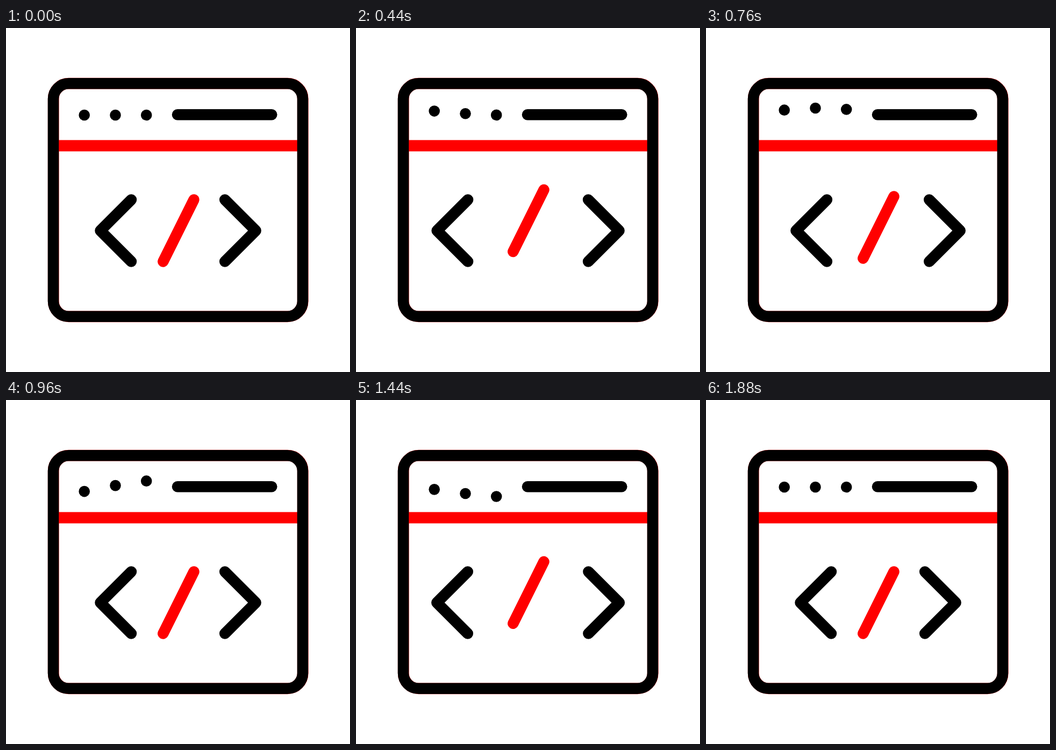
Animation, 640 px wide and 640 px high, one loop 1920 ms. Source, as an HTML page:

```html
<!DOCTYPE html>
<html lang="en">
<head>
<meta charset="utf-8">
<title>Code window</title>
<style>
  html, body { margin: 0; width: 100%; height: 100%; overflow: hidden; background: #fff; }
  svg { display: block; width: 100%; height: 100%; }
</style>
</head>
<body>
<svg viewBox="0 0 640 640" fill="none" stroke="#000" stroke-width="20.5" stroke-linecap="round" stroke-linejoin="round">
  <path d="M97 219H543" stroke="#f00" stroke-width="21" stroke-linecap="butt"/>
  <rect x="88.2" y="103.2" width="464" height="433.6" rx="28.5" stroke="#f00" stroke-width="20.7"/>
  <rect x="88" y="103.3" width="464" height="433.5" rx="28.5"/>
  <path d="M319 161.2H494.3"/>
  <g id="dots" fill="#000" stroke="none">
    <circle cx="145.7" cy="162" r="10.3"/>
    <circle cx="203.5" cy="162" r="10.3"/>
    <circle cx="261.2" cy="162" r="10.3"/>
  </g>
  <path id="left" d="M233 319.5L175.5 377L233 434.5"/>
  <path id="slash" d="M349.5 319.5L292.3 434.5" stroke="#f00"/>
  <path id="right" d="M407.2 319.5L464.7 377L407.2 434.5"/>
</svg>
<script>
  const LOOP = 1920, STEP = 40;
  const DOT_START = 180, DOT_DELAY = 118;

  // Keys are [time in ms, value].
  const spread = [[80, 0], [480, 1], [543, 1], [890, 0], [990, 0], [1390, 1], [1410, 1], [1805, 0]];
  const bounce = [[0, 0], [475, -13], [965, 18], [985, 18], [1390, 0]];

  const dots = [...document.querySelectorAll('#dots circle')];
  const [left, slash, right] = ['left', 'slash', 'right'].map(id => document.getElementById(id));

  const ease = x => x * x * (3 - 2 * x);

  function valueAt(keys, t) {
    if (t <= keys[0][0]) return keys[0][1];
    for (let i = 1; i < keys.length; i++) {
      const [t0, v0] = keys[i - 1], [t1, v1] = keys[i];
      if (t < t1) return v0 + (v1 - v0) * ease((t - t0) / (t1 - t0));
    }
    return keys[keys.length - 1][1];
  }

  const move = (el, x, y) => el.setAttribute('transform', `translate(${x.toFixed(2)} ${y.toFixed(2)})`);

  function draw(now) {
    const t = Math.floor((now % LOOP) / STEP) * STEP;
    const open = valueAt(spread, t);
    move(left, -25.6 * open, 0);
    move(right, 25.6 * open, 0);
    move(slash, 0, -19 * open);
    dots.forEach((dot, i) => move(dot, 0, valueAt(bounce, t - DOT_START - i * DOT_DELAY)));
  }

  function tick() {
    draw(performance.now());
    requestAnimationFrame(tick);
  }
  tick();
</script>
</body>
</html>
```
